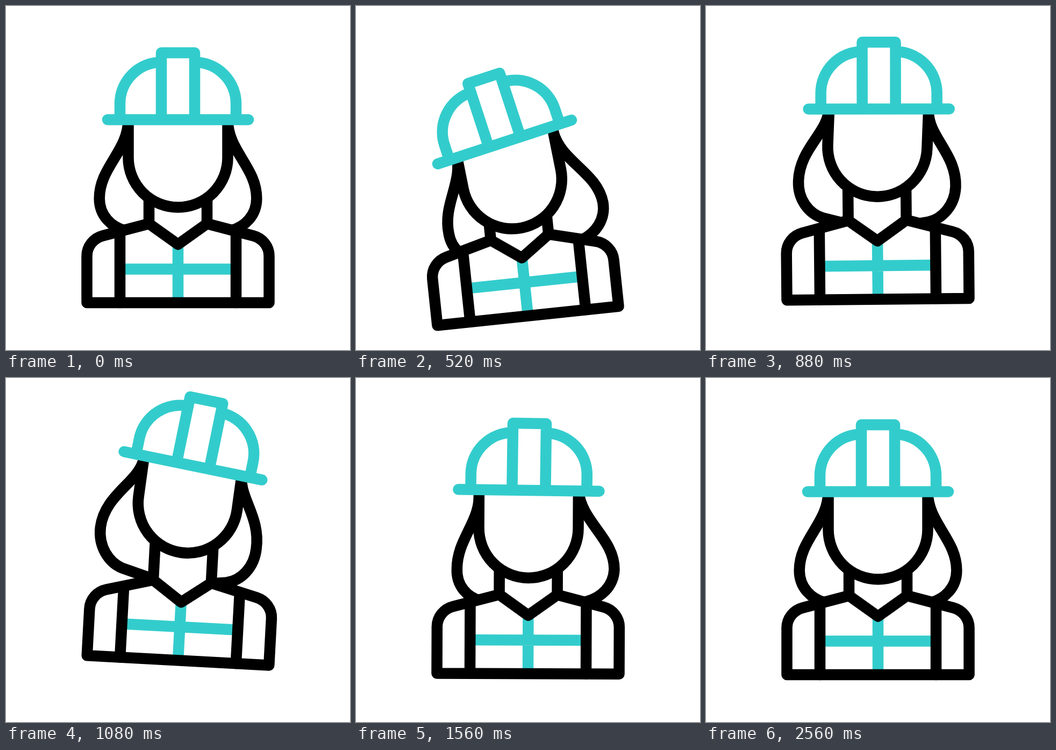
Recreate the animation shown at these times as an HTML page with a canvas. Size 640 px wide and 640 px high, loop 2.64 s.

```html
<!DOCTYPE html>
<html lang="en">
<head>
<meta charset="utf-8">
<title>Builder</title>
<style>
  html, body { margin: 0; width: 100%; height: 100%; overflow: hidden; background: #fff; }
  canvas { display: block; }
</style>
</head>
<body>
<canvas id="stage" width="640" height="640"></canvas>
<script>
const ctx = document.getElementById('stage').getContext('2d');
const LOOP = 2640, STEP = 40, RISE_TIME = 1120;
const BLACK = '#000', TEAL = '#33cccc', WHITE = '#fff';

const ease = u => u * u * u * (10 + u * (6 * u - 15));

// Eases from zero through [time, value] poses and holds the last one.
function swing(...poses) {
  return time => {
    let [t0, v0] = [0, 0];
    for (const [t1, v1] of poses) {
      if (time < t1) return v0 + (v1 - v0) * ease((time - t0) / (t1 - t0));
      [t0, v0] = [t1, v1];
    }
    return v0;
  };
}

// Down to one side, up to the other, then back to rest.
const nod = (dipTime, dip, rise, restTime) =>
  swing([dipTime, dip], [RISE_TIME, rise], [restTime, 0]);

const bodyTurn = nod(580, -6.07, 3.1, 1680);
const bodyDrop = nod(580, 24.7, -26.8, 1680);
const headTurn = nod(360, -6.05, 4.8, 1620);
const headDrop = nod(460, 14, -23, 1640);
const hatTurn = nod(665, -7.3, 3.8, 1720);
const hairLift = nod(440, 0, 14, 1560);
const hairSway = swing([670, 11.9], [1100, -8.6], [1690, 15.3], [2200, -3.4], [2560, 0]);

const shape = d => new Path2D(d);
const neckArea = shape('M266 300H374V405L320 443.5L266 405Z');
const neck = shape('M266 300V405M374 300V405');
const torso = shape(
  'M150.5 552V465C150.5 447 163 432 180 427.5L266 405L320 443.5L374 405' +
  'L460 427.5C477 432 489.5 447 489.5 465V552Z');
const straps = shape('M212 424V552M428 424V552');
const vest = shape('M212 489.5H428M320 444V552');
const face = shape('M227.5 195V282A92.5 92.5 0 0 0 412.5 282V195');
const hatArea = shape('M212 211.5V182A77.5 77.5 0 0 1 289 104.5V87H351V104.5A77.5 77.5 0 0 1 428 182V211.5Z');
const dome = shape('M212 211.5V182A77.5 77.5 0 0 1 289 104.5M351 104.5A77.5 77.5 0 0 1 428 182V211.5');
const crest = shape('M289 211.5V87H351V211.5');
const brim = shape('M189 211.5H451');

// The side is -1 for left and 1 for right; the strand is fixed under the hat.
function strand(side, sway, lift) {
  const at = (out, y, bend = 0, rise = 0) => [320 + side * out + sway * bend, y - lift * rise];
  const path = new Path2D();
  path.moveTo(...at(92.5, 195));
  path.lineTo(...at(92.5, 212));
  path.bezierCurveTo(...at(92.5, 270, .4, 1), ...at(146.3, 300, 1, 1), ...at(146.3, 358, 1, .7));
  path.bezierCurveTo(...at(146.3, 390, .9, .4), ...at(124, 411, .8), ...at(98, 418, .75));
  path.lineTo(...at(40, 430, .6));
  return path;
}

function line(path, color, cap = 'butt') {
  ctx.strokeStyle = color;
  ctx.lineCap = cap;
  ctx.stroke(path);
}

function blank(path) {
  ctx.fillStyle = WHITE;
  ctx.fill(path);
}

function turn(degrees, y) {
  ctx.translate(320, y);
  ctx.rotate(degrees * Math.PI / 180);
  ctx.translate(-320, -y);
}

function enterBody(time) {
  ctx.translate(0, bodyDrop(time));
  turn(bodyTurn(time), 552);
}

function enterHead(time) {
  enterBody(time);
  ctx.translate(0, headDrop(time));
  turn(headTurn(time), 313);
}

function layer(paint) {
  ctx.save();
  paint();
  ctx.restore();
}

function draw(time) {
  ctx.fillStyle = WHITE;
  ctx.fillRect(0, 0, 640, 640);
  ctx.lineWidth = 20.5;
  ctx.lineJoin = 'round';

  layer(() => {
    enterHead(time);
    for (const side of [-1, 1]) line(strand(side, hairSway(time), hairLift(time)), BLACK);
  });

  layer(() => {
    enterBody(time);
    blank(neckArea);
    blank(torso);
    line(vest, TEAL);
    line(neck, BLACK);
    line(straps, BLACK, 'round');
    line(torso, BLACK);
  });

  layer(() => {
    enterHead(time);
    blank(face);
    line(face, BLACK);
    turn(hatTurn(time), 211.5);
    blank(hatArea);
    line(dome, TEAL);
    line(crest, TEAL);
    line(brim, TEAL, 'round');
  });
}

function tick() {
  const time = performance.now() % LOOP;
  draw(Math.floor(time / STEP) * STEP);
  requestAnimationFrame(tick);
}
tick();
</script>
</body>
</html>
```
